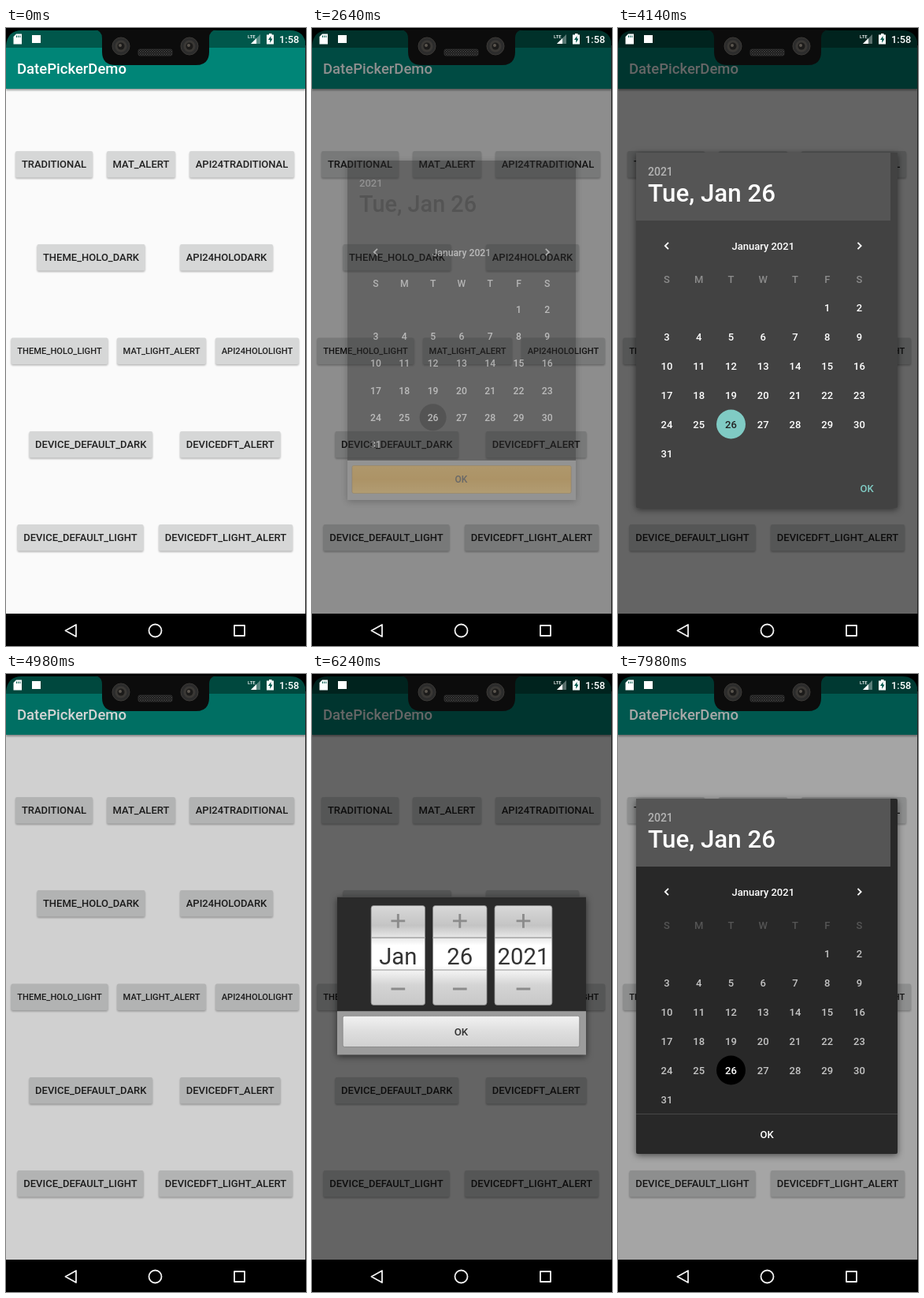
An HTML page for the animation above (8 s loop, 381x783 px).

```html
<!DOCTYPE html>
<html lang="en">
<head>
<meta charset="utf-8">
<title>Date picker demo</title>
<style>
  html, body { margin: 0; width: 100%; height: 100%; overflow: hidden; background: #000; }
  svg { display: block; width: 381px; height: 783px; }
  text { font-family: Roboto, sans-serif; font-weight: 500; white-space: pre; }
  .dialog { filter: drop-shadow(0 2px 4px rgba(0, 0, 0, .55)); }
</style>
</head>
<body>
<svg id="stage" viewBox="0 0 381 783"></svg>
<script>
const LOOP = 8000, STEP = 60, FULL_DIM = 0.6;
const stage = document.getElementById('stage');

const rect = (x, y, w, h, fill, more = '') =>
  `<rect x="${x}" y="${y}" width="${w}" height="${h}" fill="${fill}" ${more}/>`;
const circle = (x, y, r, fill, more = '') =>
  `<circle cx="${x}" cy="${y}" r="${r}" fill="${fill}" ${more}/>`;
const path = (d, fill, more = '') => `<path d="${d}" fill="${fill}" ${more}/>`;
const text = (x, y, size, fill, label, more = 'text-anchor="middle"') =>
  `<text x="${x}" y="${y}" font-size="${size}" fill="${fill}" ${more}>${label}</text>`;
const gradient = (id, ...colors) =>
  `<linearGradient id="${id}" x2="0" y2="1">${colors.map((c, i) =>
    `<stop offset="${i / (colors.length - 1)}" stop-color="${c}"/>`).join('')}</linearGradient>`;

// Main screen
const rows = [
  { y: 156, size: 13, buttons: [['TRADITIONAL', 12, 98], ['MAT_ALERT', 128, 87], ['API24TRADITIONAL', 233, 133]] },
  { y: 274, size: 13, buttons: [['THEME_HOLO_DARK', 39.5, 137], ['API24HOLODARK', 221, 118]] },
  { y: 392.5, size: 11.15, buttons: [['THEME_HOLO_LIGHT', 6.5, 123], ['MAT_LIGHT_ALERT', 141, 113], ['API24HOLOLIGHT', 266, 106]] },
  { y: 511, size: 13, buttons: [['DEVICE_DEFAULT_DARK', 29.5, 156.5], ['DEVICEDFT_ALERT', 221, 127.5]] },
  { y: 629, size: 13, buttons: [['DEVICE_DEFAULT_LIGHT', 14.5, 160], ['DEVICEDFT_LIGHT_ALERT', 194, 170]] }
];

const button = (label, x, y, w, size) =>
  rect(x, y + 1.5, w, 33.5, '#000', 'rx="2" opacity=".28" filter="url(#soft)"') +
  rect(x - .5, y + 1, w + 1, 35, '#000', `rx="3" opacity="0" filter="url(#softer)" id="lift-${label}"`) +
  rect(x, y, w, 33.5, '#d6d7d7', 'rx="2"') +
  rect(x, y, w, 33.5, '#000', `rx="2" opacity="0" id="ripple-${label}"`) +
  text(x + w / 2, y + 16.8 + size * .355, size, '#212121', label);

const screen =
  rect(0, 3, 380, 739, '#fafafa') +
  rect(0, 74, 380, 5, '#000', 'opacity=".35" filter="url(#soft)"') +
  rect(0, 25, 380, 52, '#008577') +
  rect(0, 3, 380, 22, '#00574b') +
  text(14, 58, 18.5, '#fff', 'DatePickerDemo', '') +
  rows.map(r => r.buttons.map(([label, x, w]) => button(label, x, r.y, w, r.size)).join('')).join('');

// Phone body, status icons and navigation keys
const camera = x =>
  circle(x, 23, 11, '#2c2c2c', 'stroke="#3c3a37"') + circle(x, 23, 7.5, '#3a3835') +
  circle(x, 23, 4.5, '#1c1b1a') + circle(x - 1, 22, 2, '#5b564e');

const phone =
  path('M0 0H381V22Q379 3 361 3H20Q2 3 0 22Z', '#000') +
  path('M112 2Q122 3 122 13V30Q122 47 139 47H241Q258 47 258 30V13Q258 3 268 2Z', '#0c0c0c') +
  camera(146) + camera(233) +
  rect(168, 27, 43, 8, 'url(#mesh)', 'rx="2" stroke="#333" stroke-width=".8"') +
  path('M13 7.5H20V20.5H9.5V11Z', '#fff') +
  path('M13.5 9.5V12M15.7 9.5V12M17.9 9.5V12', 'none', 'stroke="#00574b"') +
  rect(33, 9, 11, 10, '#fff') +
  text(307, 12.5, 6, '#fff', 'LTE', '') +
  path('M323 8V20H311Z', '#fff', 'opacity=".35"') + path('M318 13V20H311Z', '#fff') +
  path('M331 8.5H334V7H337.5V8.5H340V20.5H331Z', '#fff') +
  path('M336.5 10L333 15H335.3V19L338.5 13.5H336.5Z', '#00574b') +
  text(347, 19, 12.8, '#fff', '1:58', '') +
  rect(0, 742, 381, 41, '#000') + rect(380, 22, 1, 720, '#222') +
  `<g fill="none" stroke="#f2f2f2" stroke-width="1.8" stroke-linejoin="round">
    <path d="M89 756V771L75.5 763.5Z"/><circle cx="189.5" cy="763.5" r="8"/>
    <rect x="290" y="757" width="13" height="13"/></g>`;

// Calendar page for January 2021, which begins on a Friday
function calendar({ x, dx, month, week, day, dy, size, radius, dot, dotText, weekColor, dayColor }) {
  const mid = x + 3 * dx, last = x + 6 * dx;
  const arrow = (cx, dir) => path(`M${cx - 2 * dir} ${month - 4.2}l${4.2 * dir} 4.2l${-4.2 * dir} 4.2`,
    'none', 'stroke="#fff" stroke-width="1.8"');
  let out = arrow(x, -1) + arrow(last, 1) + text(mid, month + 4.6, size, '#fff', 'January 2021');
  [...'SMTWTFS'].forEach((d, i) => out += text(x + i * dx, week + 4.6, size, weekColor, d));
  for (let d = 1; d <= 31; d++) {
    const cell = d + 4, cx = x + cell % 7 * dx, cy = day + Math.floor(cell / 7) * dy;
    if (d === 26) out += circle(cx, cy, radius, dot);
    out += text(cx, cy + 4.6, size, d === 26 ? dotText : dayColor, d);
  }
  return out;
}

const wideCalendar = { x: 62, dx: 40.75, month: 276, week: 318.5, day: 354, dy: 37, size: 13, radius: 18.5 };
const wideHeader =
  rect(23, 158, 323, 86, '#555') +
  text(38, 187, 14, '#b4b4b4', '2021', '') + text(38, 220, 31.3, '#fff', 'Tue, Jan 26', '');

const traditional =
  rect(45, 168, 290, 430, '#2a2a2a') +
  text(60, 201, 13, '#999', '2021', '') + text(60, 233, 28.8, '#000', 'Tue, Jan 26', '') +
  calendar({ x: 81, dx: 36.3, month: 284, week: 323.5, day: 356, dy: 34.3, size: 12.2, radius: 17,
    dot: '#000', dotText: '#fff', weekColor: '#eee', dayColor: '#fff' }) +
  rect(45, 548, 290, 50, '#9c9c9c') +
  rect(51, 554.5, 278, 35, 'url(#key)', 'rx="2" stroke="#777" stroke-width=".6"') +
  rect(51, 554.5, 278, 35, 'url(#pressed)', 'rx="2" stroke="#a87c2c" stroke-width=".6" id="okPressed"') +
  text(189.5, 576, 12, '#333', 'OK', 'text-anchor="middle" font-weight="400"');

const materialAlert =
  rect(23, 158, 332, 450, '#424242', 'rx="2"') + rect(346, 158, 9, 86, '#424242') + wideHeader +
  calendar({ ...wideCalendar, dot: '#80cbc4', dotText: '#222', weekColor: '#8c8c8c', dayColor: '#fff' }) +
  text(316, 587.5, 13, '#80cbc4', 'OK');

const spinner = (x, w, label) =>
  rect(x, 302, w, 114, 'url(#wheel)', 'rx="3" stroke="#888" stroke-width=".7"') +
  rect(x, 338, w, 1.5, '#aaa') + rect(x, 375, w, 1.5, '#bbb') +
  path(`M${x + w / 2 - 8} 319.5h16m-8 -8v16M${x + w / 2 - 8} 397.5h16`, 'none',
    'stroke="#8b8b8b" stroke-width="2.6"') +
  `<text x="${x + w / 2}" y="369.5" font-size="26.5" fill="#333" text-anchor="middle" style="font-weight:400">${label}</text>`;

const spinners =
  rect(47, 292, 286, 181, '#9c9c9c') + rect(47, 292, 286, 131, '#2a2a2a') +
  spinner(86, 62, 'Jan') + spinner(157, 62, '26') + spinner(228, 66, '2021') +
  rect(53.5, 428.5, 272, 35.5, 'url(#key)', 'rx="2" stroke="#777" stroke-width=".6"') +
  text(189.5, 450.5, 12, '#333', 'OK');

const holoDark =
  rect(23, 158, 332, 450, '#282828', 'rx="2"') + wideHeader +
  calendar({ ...wideCalendar, dot: '#000', dotText: '#fff', weekColor: '#555', dayColor: '#c4c4c4' }) +
  rect(23, 557, 332, 1, '#484848') + text(189, 587.5, 13, '#fff', 'OK');

// drawn: scale at which the dialog is laid out; dimStep: dim gained per step while opening
const shows = [
  { name: 'TRADITIONAL', art: traditional, press: 660, lift: .06, ripple: 1500, open: 1500, close: 2640, end: 2820, drawn: .92, cy: 405, dimStep: .125 },
  { name: 'MAT_ALERT', art: materialAlert, press: 3480, lift: .35, ripple: 4020, open: 4020, close: 4860, end: 5040, drawn: 1, cy: 383, dimStep: .25 },
  { name: 'API24TRADITIONAL', art: spinners, press: 5640, lift: .35, ripple: 5820, open: 5940, close: 6720, end: 6840, drawn: .905, cy: 383, dimStep: .12 },
  { name: 'THEME_HOLO_DARK', art: holoDark, press: 7440, lift: .35, ripple: 7800, open: 7860, close: LOOP, end: LOOP, drawn: 1, cy: 383, dimStep: .12 }
];
const OK_PRESS = 2460;

stage.innerHTML =
  `<defs>
    <filter id="soft" x="-10%" y="-30%" width="120%" height="170%"><feGaussianBlur stdDeviation="1"/></filter>
    <filter id="softer" x="-10%" y="-30%" width="120%" height="170%"><feGaussianBlur stdDeviation="2"/></filter>
    <pattern id="mesh" width="3" height="3" patternUnits="userSpaceOnUse">
      <rect width="3" height="3" fill="#151515"/><path d="M0 0L3 3M3 0L0 3" stroke="#444" stroke-width=".7"/></pattern>
    ${gradient('key', '#f2f2f2', '#dedede', '#d0d0d0')}
    ${gradient('pressed', '#e3a83c', '#dc9d2e', '#e8b44c')}
    ${gradient('wheel', '#d8d8d8', '#c4c4c4', '#fff', '#fff', '#d4d4d4', '#c8c8c8')}
  </defs>` +
  screen + rect(0, 3, 380, 739, '#000', 'id="dim"') +
  shows.map(s => `<g class="dialog" id="dialog-${s.name}">${s.art}</g>`).join('') + phone;

const byId = id => document.getElementById(id);
const setOpacity = (id, value) => byId(id).setAttribute('opacity', value);

function dialogPose(show, t) {
  if (t < show.open || t >= show.end) return { dim: 0, alpha: 0, scale: 1 };
  if (t < show.close) {
    const i = Math.floor((t - show.open) / STEP);
    return {
      dim: Math.min(FULL_DIM, .1 + i * show.dimStep),
      alpha: [.6, .9][i] ?? 1,
      scale: [.905, .975][i] ?? 1
    };
  }
  // Closing always lands on the same tail, whatever its length
  const i = Math.floor((t - show.close) / STEP) + 3 - (show.end - show.close) / STEP;
  return { dim: .44 - i * .135, alpha: [.4, .12][i] ?? 0, scale: .92 - i * .01 };
}

function render(t) {
  let dim = 0;
  for (const show of shows) {
    const pose = dialogPose(show, t), k = pose.scale / show.drawn;
    const dialog = byId('dialog-' + show.name);
    dim = Math.max(dim, pose.dim);
    dialog.style.display = pose.alpha ? '' : 'none';
    dialog.setAttribute('opacity', pose.alpha);
    dialog.setAttribute('transform', `translate(190 ${show.cy}) scale(${k}) translate(-190 ${-show.cy})`);
    setOpacity('lift-' + show.name, t >= show.press && t < show.open + 2 * STEP ? show.lift : 0);
    setOpacity('ripple-' + show.name, t >= show.ripple && t < show.open + 2 * STEP ? .07 : 0);
  }
  setOpacity('dim', dim);
  setOpacity('okPressed', t >= OK_PRESS ? 1 : 0);
}

const start = performance.now();
function tick() {
  render((performance.now() - start) % LOOP);
  requestAnimationFrame(tick);
}
tick();
</script>
</body>
</html>
```
